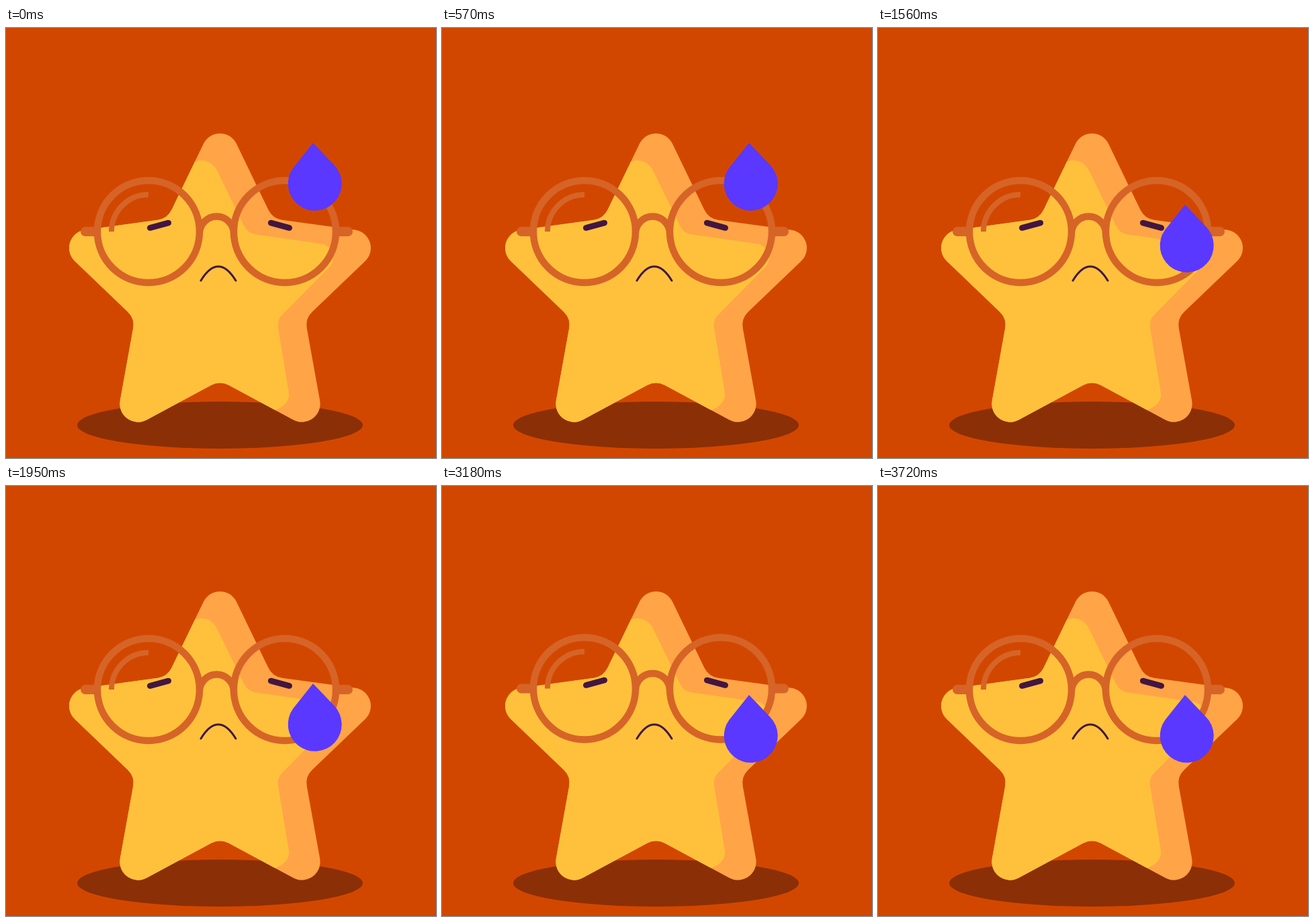
Recreate the animation shown at these times as an HTML page with a canvas. Size 640 px wide and 640 px high, loop 6.33 s.

```html
<!DOCTYPE html>
<html lang="en">
<head>
<meta charset="utf-8">
<title>Sweating star</title>
<style>
  html, body { margin: 0; width: 100%; height: 100%; overflow: hidden; background: #d24700; }
  canvas { display: block; width: 640px; height: 640px; }
</style>
</head>
<body>
<canvas width="640" height="640"></canvas>
<script>
const ctx = document.querySelector('canvas').getContext('2d');
const LOOP = 6330, STEP = 30;
const FRAME = '#d66427', INK = '#431640';

// Star with every corner rounded by the same radius
function starPath(cx, cy, outer, inner, radius) {
  const pts = Array.from({ length: 10 }, (_, i) => {
    const a = i * Math.PI / 5, r = i % 2 ? inner : outer;
    return [cx + r * Math.sin(a), cy - r * Math.cos(a)];
  });
  const path = new Path2D();
  path.moveTo((pts[9][0] + pts[0][0]) / 2, (pts[9][1] + pts[0][1]) / 2);
  pts.forEach((p, i) => path.arcTo(...p, ...pts[(i + 1) % 10], radius));
  path.closePath();
  return path;
}

const star = starPath(318.5, 391.5, 270, 133.2, 27.2);
const light = new Path2D('M281 199C294 194 307 199 314 212L354 294Q359.5 305 370 307' +
  'L468 321C486 323 493 344 481 356L412 426Q403 435 405 446L421 543' +
  'C422 556 414 563 400 569V640H0V199Z');
const temples = new Path2D('M118 303H134M493 303H509');
const rims = new Path2D('M136 303a76 76 0 1 0 152 0a76 76 0 1 0 -152 0' +
  'M339 303a76 76 0 1 0 152 0a76 76 0 1 0 -152 0M288 306A25.5 25.5 0 0 1 339 306');
const shine = new Path2D('M157 303A55 55 0 0 1 212 248');
const eyes = new Path2D('M214.3 297.5L241.8 290M394.2 290L421.7 297.5');
const mouth = new Path2D('M290 376C307 348 325 348 342 376');
const drop = new Path2D('M457 171L488 203.5A40 40 0 1 1 427.5 208Z');

// Cubic ease: steady start, soft stop
function ease(u) {
  if (u <= 0 || u >= 1) return u <= 0 ? 0 : 1;
  const curve = (s, a, b) => 3 * a * s * (1 - s) ** 2 + 3 * b * s * s * (1 - s) + s ** 3;
  let lo = 0, hi = 1;
  for (let i = 0; i < 24; i++) {
    const mid = (lo + hi) / 2;
    if (curve(mid, 1 / 6, 2 / 3) < u) lo = mid; else hi = mid;
  }
  return curve(lo, 1 / 6, 1);
}

// Up and back down within the given duration
const hop = (t, dur) => ease(1 - Math.abs(2 * t / dur - 1));

function stroke(path, color, width, cap = 'butt') {
  ctx.strokeStyle = color;
  ctx.lineWidth = width;
  ctx.lineCap = cap;
  ctx.stroke(path);
}

function fill(path, color) {
  ctx.fillStyle = color;
  ctx.fill(path);
}

function shifted(dy, paint) {
  ctx.save();
  ctx.translate(0, dy);
  paint();
  ctx.restore();
}

function draw(t) {
  ctx.fillStyle = '#d24700';
  ctx.fillRect(0, 0, 640, 640);

  const shadow = new Path2D();
  shadow.ellipse(318.5, 591, 212.5, 35, 0, 0, 2 * Math.PI);
  fill(shadow, '#8b2f06');

  fill(star, '#ffa447');
  ctx.save();
  ctx.clip(star);
  fill(light, '#ffc13c');
  ctx.restore();

  const hopTime = t < 3150 ? t : t - 3150;
  shifted(-6.8 * hop(hopTime, 510), () => stroke(eyes, INK, 8.6, 'round'));
  stroke(mouth, INK, 3, 'round');
  shifted(-12.3 * hop(hopTime, 570), () => {
    stroke(temples, FRAME, 14, 'round');
    stroke(rims, FRAME, 10.5);
    stroke(shine, FRAME, 8);
  });
  shifted(140 * ease((t - 660) / 1740), () => fill(drop, '#5b38ff'));
}

const start = performance.now();
function tick() {
  const t = (performance.now() - start) % LOOP;
  draw(Math.floor(t / STEP) * STEP);
  requestAnimationFrame(tick);
}
tick();
</script>
</body>
</html>
```
